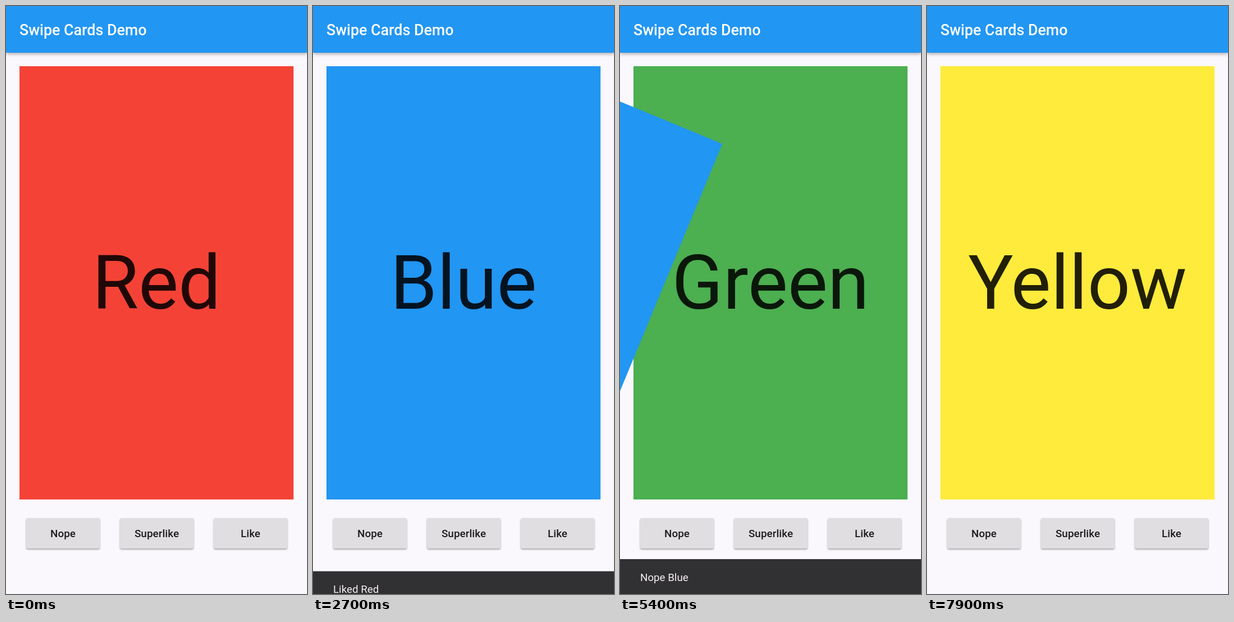
Recreate the animation shown at these times as an HTML page. Size 536 by 1045 pixels, loop 8 s.

```html
<!DOCTYPE html>
<html lang="en">
<head>
<meta charset="utf-8">
<title>Swipe cards</title>
<style>
  html, body { margin: 0; width: 100%; height: 100%; overflow: hidden; background: #faf8fc; }
  svg { display: block; width: 100%; height: 100%; font-family: Roboto, sans-serif; }
  .label { font-size: 134px; text-anchor: middle; fill: #000; fill-opacity: .87; }
  .button rect { fill: #e0dee1; filter: drop-shadow(0 2px 1.6px rgba(0, 0, 0, .32)); }
  .button text { font-size: 18.76px; font-weight: 500; text-anchor: middle; letter-spacing: .1px; fill: #1c1b1d; }
  .bar { fill: #2196f3; filter: drop-shadow(0 2px 3px rgba(0, 0, 0, .35)); }
  .title { font-size: 26.8px; font-weight: 500; fill: #fff; }
  .snack text { font-size: 18.76px; fill: #f4eff4; }
</style>
</head>
<body>
<svg id="stage" viewBox="0 0 536 1045">
  <rect width="536" height="1045" fill="#faf8fc"/>
  <g id="cards"></g>
  <g id="buttons"></g>
  <clipPath id="nopeClip"><rect x="36" y="910" width="131" height="54" rx="3"/></clipPath>
  <circle id="ripple" cx="101" cy="937" fill="#000" clip-path="url(#nopeClip)"/>
  <rect class="bar" width="536" height="83"/>
  <text class="title" x="24" y="51.5">Swipe Cards Demo</text>
  <g id="snack" class="snack">
    <rect y="983" width="536" height="64" fill="#313033"/>
    <text id="message" x="36" y="1021.5"></text>
  </g>
  <g id="touch">
    <circle r="18.5" fill="#fff" fill-opacity=".22"/>
    <circle r="16" fill="#eef0ee" fill-opacity=".72" stroke="#86b4a8" stroke-opacity=".7" stroke-width="1.2"/>
  </g>
</svg>
<script>
const LOOP = 8000, STEP = 100, WIDTH = 536, SLIDE = 500;
const byId = id => document.getElementById(id);
const clamp = v => Math.min(1, Math.max(0, v));
const progress = (t, start, length) => clamp((t - start) / length);
const mix = (a, b, p) => a + (b - a) * p;

function add(parent, name, attrs, text) {
  const node = document.createElementNS('http://www.w3.org/2000/svg', name);
  for (const key in attrs) node.setAttribute(key, attrs[key]);
  if (text) node.textContent = text;
  parent.append(node);
  return node;
}

// Each card: drag from `down` to `release`, then a linear slide from `drag` to `exit`.
const cards = [
  { name: 'Red', color: '#f44336', down: 1200, release: 2095, power: 1.7,
    anchor: [105, 636], drag: [426, 25], exit: [1070, 62] },
  { name: 'Blue', color: '#2196f3', down: 4900, release: 5150, power: 1,
    anchor: [268, 694], drag: [0, 0], exit: [-1072, 0] },
  { name: 'Green', color: '#4caf50', down: 7150, release: 7450, power: 1.6,
    anchor: [331, 662], drag: [-29.5, -209], exit: [-292, -2070] },
  { name: 'Yellow', color: '#ffeb3b', release: Infinity }
];
for (const card of [...cards].reverse()) {
  card.node = add(byId('cards'), 'g', {});
  add(card.node, 'rect', { x: 24, y: 107, width: 488, height: 770, fill: card.color });
  add(card.node, 'text', { class: 'label', x: 268, y: 537.5 }, card.name);
}

['Nope', 'Superlike', 'Like'].forEach((name, i) => {
  const x = 36 + i * 167;
  const button = add(byId('buttons'), 'g', { class: 'button' });
  add(button, 'rect', { x, y: 910, width: 131, height: 54, rx: 3 });
  add(button, 'text', { x: x + 65.5, y: 944 }, name);
});

const snacks = [
  { start: 2595, text: 'Liked Red' },
  { start: 5150, text: 'Nope Blue' }
];

// cubic-bezier(.4, 0, .2, 1)
function fastOutSlowIn(x) {
  let lo = 0, hi = 1, s = .5;
  for (let i = 0; i < 24; i++) {
    s = (lo + hi) / 2;
    const at = 1.2 * s * (1 - s) ** 2 + .6 * s * s * (1 - s) + s ** 3;
    if (at < x) lo = s; else hi = s;
  }
  return 3 * s * s * (1 - s) + s ** 3;
}

function offsetAt(card, t) {
  if (!card.drag) return [0, 0];
  const pull = progress(t, card.down, card.release - card.down) ** card.power;
  const slide = progress(t, card.release, SLIDE);
  return card.drag.map((d, i) => mix(d * pull, card.exit[i], slide));
}

function drawCards(t) {
  const front = cards.findIndex(card => t < card.release + SLIDE);
  const offset = offsetAt(cards[front], t);
  cards.forEach((card, i) => {
    card.node.style.display = i === front || i === front + 1 ? '' : 'none';
    if (i === front) {
      const [dx, dy] = offset, [ax, ay] = card.anchor || [268, 492];
      card.node.setAttribute('transform',
        `translate(${dx} ${dy}) rotate(${-22.5 * dx / WIDTH} ${ax} ${ay})`);
    } else {
      const scale = .9 + .1 * clamp(Math.hypot(...offset) / 100);
      card.node.setAttribute('transform',
        `translate(268 492) scale(${scale}) translate(-268 -492)`);
    }
  });
}

function drawTouch(t) {
  const card = cards.find(c => t >= c.down && t < c.release + 50);
  const touch = byId('touch');
  touch.style.display = card ? '' : 'none';
  if (!card) return;
  const tap = card.name === 'Blue';
  const [dx, dy] = offsetAt(card, Math.min(t, card.release));
  const x = tap ? 101 : card.anchor[0] + dx;
  const y = tap ? 937 : card.anchor[1] + dy;
  touch.setAttribute('transform', `translate(${x} ${y})`);
  touch.setAttribute('opacity', t > card.release ? .75 : 1);
}

function drawSnack(t) {
  const snack = snacks.find(s => t >= s.start && t < s.start + 1000);
  const enter = snack ? progress(t, snack.start, 250) : 0;
  const leave = snack ? progress(t, snack.start + 750, 250) : 0;
  const shown = fastOutSlowIn(enter - leave);
  byId('snack').style.display = snack ? '' : 'none';
  byId('snack').setAttribute('transform', `translate(0 ${62 * (1 - shown)})`);
  byId('message').textContent = snack ? snack.text : '';
}

function drawRipple(t) {
  byId('ripple').setAttribute('r', 80 * progress(t, 4900, 300));
  byId('ripple').setAttribute('opacity', .08 * (1 - progress(t, 5150, 200)));
}

function render(now) {
  const t = Math.floor((now % LOOP) / STEP) * STEP;
  drawCards(t);
  drawTouch(t);
  drawSnack(t);
  drawRipple(t);
}

const begin = performance.now();
function tick() {
  render(performance.now() - begin);
  requestAnimationFrame(tick);
}
tick();
</script>
</body>
</html>
```
